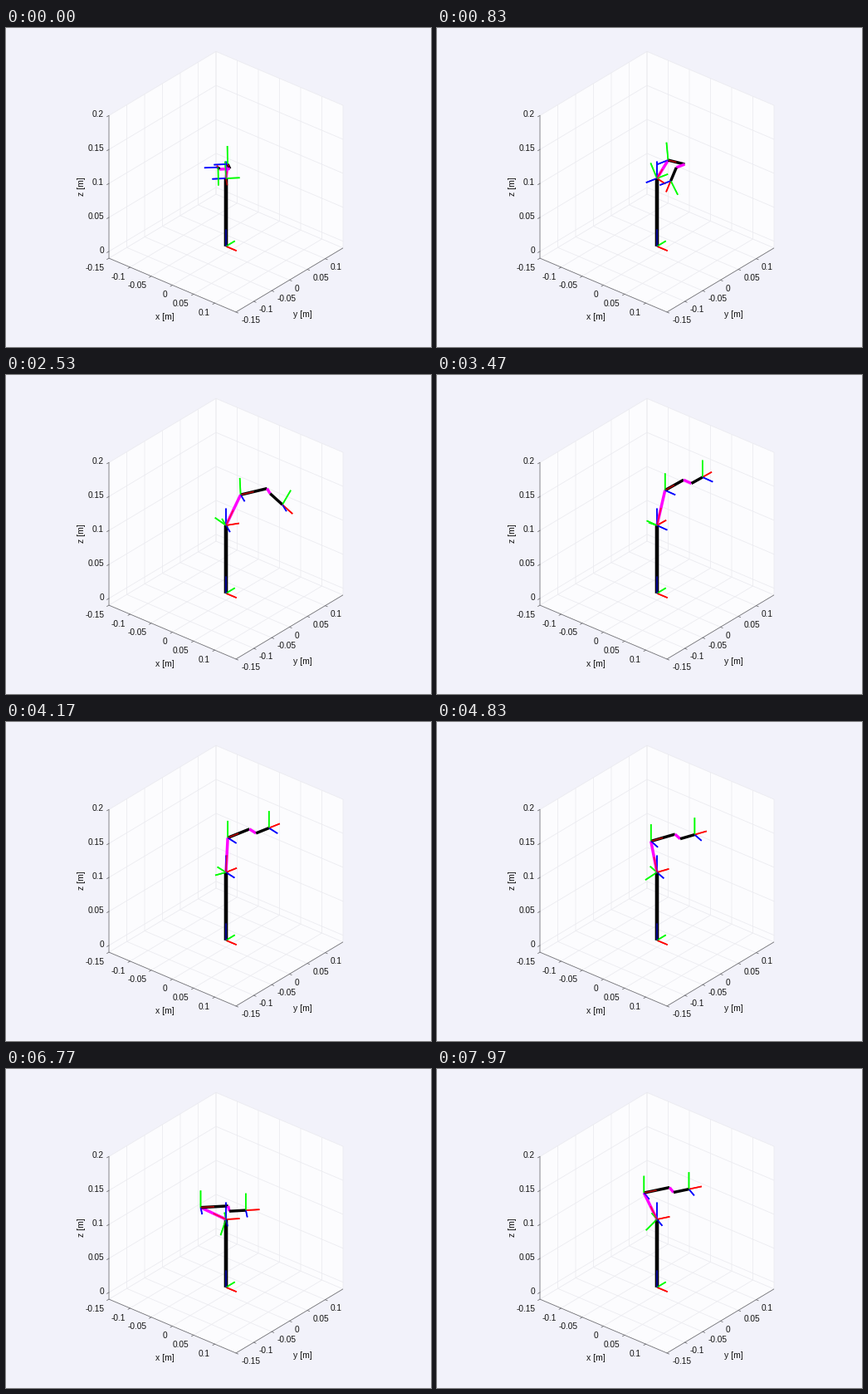
A matplotlib script that plays this animation: 512 px wide and 384 px high, repeating every 8 s.

```python
import numpy as np
import matplotlib.pyplot as plt
from matplotlib.animation import FuncAnimation
from matplotlib.collections import LineCollection

W, H, DPI = 512, 384, 100
PX = 72 / DPI                      # one pixel in points
ORIGIN = np.array([265.0, 262.8])
PROJ = np.array([[510, 216], [430, -257], [0, -818]])   # pixels per metre
LIM, Z0, Z1 = 0.15, -0.01, 0.2
RGB = ["#ff0000", "#00ff00", "#0000ff"]
INK, EDGE, GRID = "#141414", "#707074", "#ebebf0"
BLACK, MAGENTA = "#000000", "#ff00ff"

# robot dimensions in metres
BASE, UPPER, FORE, OFFSET, HAND, TRIAD = 0.1, 0.05, 0.05, 0.019, 0.03, 0.025
UP = np.array([0, 0, 1.0])

# joint angles in degrees at the ends of each move
HOME = np.array([-45, 45, -30, -178.0])
REACH = np.array([90, 60, -60, 0.0])
FOLD = np.array([45, 160, -160, 0.0])
MOVES = [(HOME, REACH), (REACH, FOLD), (FOLD, REACH)]
STEPS, FRAMES = 100, 240


def project(p):
    return ORIGIN + np.asarray(p, float) @ PROJ


fig = plt.figure(figsize=(W / DPI, H / DPI), dpi=DPI, facecolor="#f2f2fa")
ax = fig.add_axes([0, 0, 1, 1])
ax.set_xlim(0, W)
ax.set_ylim(H, 0)
ax.axis("off")


def line3(points, color, width):
    ax.plot(*project(points).T, color=color, lw=width * PX, zorder=1,
            solid_capstyle="butt")


def label(x, y, text, ha, size=10.1, va="center_baseline", **kw):
    ax.text(x, y, text, ha=ha, va=va, color=INK, family="Liberation Sans",
            size=size * PX, **kw)


def draw_box():
    a, b = -LIM, LIM
    walls = [
        [(a, a, Z0), (b, a, Z0), (b, b, Z0), (a, b, Z0)],
        [(a, a, Z0), (a, b, Z0), (a, b, Z1), (a, a, Z1)],
        [(a, b, Z0), (b, b, Z0), (b, b, Z1), (a, b, Z1)],
    ]
    for wall in walls:
        ax.fill(*project(wall).T, color="#fcfcfe", lw=0, zorder=0)

    for t in np.linspace(a, b, 7):
        line3([(t, a, Z0), (t, b, Z0), (t, b, Z1)], GRID, 0.8)
        line3([(b, t, Z0), (a, t, Z0), (a, t, Z1)], GRID, 0.8)
    for t in np.linspace(0, Z1, 5):
        line3([(a, a, t), (a, b, t), (b, b, t)], GRID, 0.8)

    line3([(a, a, Z1), (a, a, Z0), (b, a, Z0), (b, b, Z0)], EDGE, 0.8)


def tick(point, dx, dy):
    x, y = project(point)
    ax.plot([x, x + dx], [y, y + dy], color=EDGE, lw=0.8 * PX)
    return x, y


def draw_ticks():
    for t in np.linspace(-0.15, 0.1, 6).round(2) + 0.0:
        x, y = tick((t, -LIM, Z0), -2.4, 1.4)
        label(x - 5.8, y + 10.6, f"{t:g}", "right")
        x, y = tick((LIM, t, Z0), 2.6, 1.1)
        label(x + 6.4, y + 9.2, f"{t:g}", "left")
    for t in np.linspace(0, 0.2, 5).round(2):
        x, y = tick((-LIM, -LIM, t), -2.4, 1.4)
        label(x - 6.2, y - 2, f"{t:g}", "right")
    label(191, 348, "x [m]", "center", 10.5, "center")
    label(357, 345, "y [m]", "center", 10.5, "center")
    label(91.3, 191, "z [m]", "center", 10.5, "center", rotation=90)


def pose(k):
    start, end = MOVES[k // STEPS]
    return start + (end - start) * (k % STEPS) / (STEPS - 1)


def solve(joints):
    """Return the link segments and the triad segments in pixels."""
    q1, q2, q3, q4 = np.radians(joints)
    out = np.array([np.cos(q1), np.sin(q1), 0])
    side = np.array([np.sin(q1), -np.cos(q1), 0])

    def frame(angle):
        c, s = np.cos(angle), np.sin(angle)
        return c * out + s * UP, c * UP - s * out, side

    f2, f3, f4 = frame(q2), frame(q2 + q3), frame(q2 + q3 + q4)
    base = np.zeros(3)
    shoulder = BASE * UP
    elbow = shoulder + UPPER * f2[0]
    wrist = elbow + FORE * f3[0]
    shift = wrist + OFFSET * side
    tip = shift + HAND * f4[0]

    chain = [base, shoulder, elbow, wrist, shift, tip]
    links = [project(pair) for pair in zip(chain, chain[1:])]
    triads = [(base, np.eye(3)), (shoulder, (out, -side, UP)),
              (shoulder, f2), (elbow, f3), (tip, f4)]
    axes = [project((p, p + TRIAD * v)) for p, vs in triads for v in vs]
    return links, axes


def lines(colors, widths, **kw):
    c = LineCollection([], colors=colors, linewidths=np.array(widths) * PX,
                       capstyle="butt", snap=False, **kw)
    return ax.add_collection(c, autolim=False)


draw_box()
draw_ticks()
under = lines(RGB * 5, [1.75] * 15, zorder=4)
arm = lines([BLACK, MAGENTA, BLACK, MAGENTA, BLACK],
            [4.6, 3.5, 3.5, 3.4, 3.4], zorder=5)
over = lines(RGB * 5, [1.5] * 15, zorder=6, alpha=0.75)


def update(k):
    links, axes = solve(pose(k))
    arm.set_segments(links)
    under.set_segments(axes)
    over.set_segments(axes)
    return under, arm, over


anim = FuncAnimation(fig, update, frames=FRAMES, interval=8000 / FRAMES,
                     init_func=lambda: update(0), repeat=True, repeat_delay=0)
plt.show()
```
